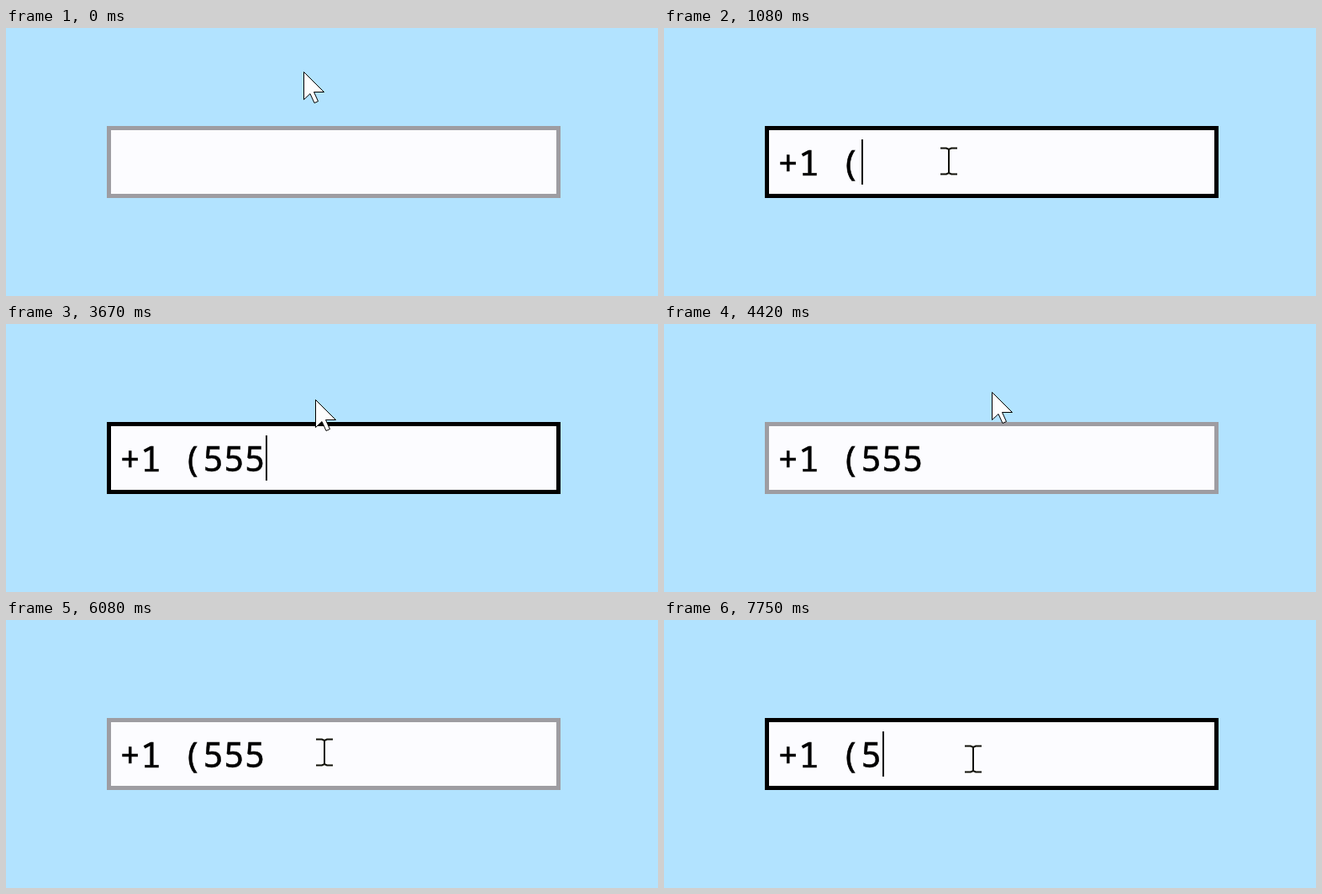
An HTML page that plays this animation: 776 px wide and 320 px high, repeating every 8 s.

```html
<!DOCTYPE html>
<html lang="en">
<head>
<meta charset="utf-8">
<title>Masked phone input</title>
<style>
  html, body { margin: 0; width: 100%; height: 100%; overflow: hidden; background: #b2e3ff; }
  svg { display: block; }
  text { font: 41.25px "Noto Sans Mono", "DejaVu Sans Mono", monospace; stroke: #000; stroke-width: .5; }
  #field { fill: #fcfcff; stroke: #9e9da2; stroke-width: 5; }
  #field.focused { stroke: #000; }
  #arrow { fill: #fdfdfd; stroke: #000; }
  #beam { fill: none; stroke: #111108; stroke-width: 2; }
</style>
</head>
<body>
<svg width="776" height="320" viewBox="0 0 776 320">
  <rect id="field" x="122.5" y="119.5" width="535" height="81"/>
  <text id="value" x="135.2" y="176"></text>
  <rect id="caret" y="133" width="2" height="54"/>
  <path id="arrow" d="M.5 .5V33.5L8 26.5L13 37.5L17.5 35.5L12.5 24.5H24.5Z"/>
  <path id="beam" d="M-10 -15.5H-3L0 -14L3 -15.5H10M0 -14V14M-10 15.5H-3L0 14L3 15.5H10"/>
</svg>
<script>
// The screen refreshes 12 times a second; all times below are in these ticks.
const RATE = 12, LOOP = 96;
const VALUE = "+1 (555", PREFIX = 4, ADVANCE = 24.75;
const BLINK = 0.53 * RATE;

const focusAt = [9, 80.6], blurAt = [52];
const typeAt = [22, 25, 29], eraseAt = [91, 93];

const home = { x: 354, y: 52 };
const moves = [
  { from: 4, to: 9, x: 336, y: 161 },
  { from: 11, to: 13, x: 341, y: 158 },
  { from: 38, to: 46, x: 386, y: 80, bow: -10 },
  { from: 51, to: 53, x: 390, y: 81 },
  { from: 63, to: 64, x: 370, y: 67 },
  { from: 66, to: 73, x: 375, y: 163, bow: 10 },
  { from: 82, to: 83, x: 368, y: 166 }
];

const [field, value, caret, arrow, beam] =
  ["field", "value", "caret", "arrow", "beam"].map(id => document.getElementById(id));

const past = (times, t) => times.filter(s => s <= t);
const show = (el, on) => el.setAttribute("visibility", on ? "visible" : "hidden");

// Each move slows down on its way up or down and may bow sideways.
function pointerAt(t) {
  let { x, y } = home;
  for (const m of moves) {
    const p = Math.min(1, Math.max(0, (t - m.from) / (m.to - m.from)));
    x += (m.x - x) * p + (m.bow || 0) * Math.sin(Math.PI * p);
    y += (m.y - y) * (1 - (1 - p) ** 1.5);
  }
  return { x: Math.round(x), y: Math.round(y) };
}

function draw(t) {
  const { x, y } = pointerAt(t);
  const overField = y >= 117;
  const focuses = past(focusAt, t);
  const focused = focuses.length > past(blurAt, t).length;
  const typed = past(typeAt, t).length - past(eraseAt, t).length;
  const count = focuses.length ? PREFIX + typed : 0;
  const lastInput = Math.max(0, ...past([...focusAt, ...typeAt, ...eraseAt], t));

  field.classList.toggle("focused", focused);
  value.textContent = VALUE.slice(0, count);
  caret.setAttribute("x", Math.round(135.9 + ADVANCE * count));
  show(caret, focused && Math.floor((t - lastInput) / BLINK) % 2 === 0);

  for (const el of [arrow, beam]) el.setAttribute("transform", `translate(${x} ${y})`);
  show(arrow, !overField);
  show(beam, overField);
}

const start = performance.now();
function tick() {
  const seconds = (performance.now() - start) / 1000;
  draw(Math.floor(seconds * RATE) % LOOP);
  requestAnimationFrame(tick);
}
tick();
</script>
</body>
</html>
```
